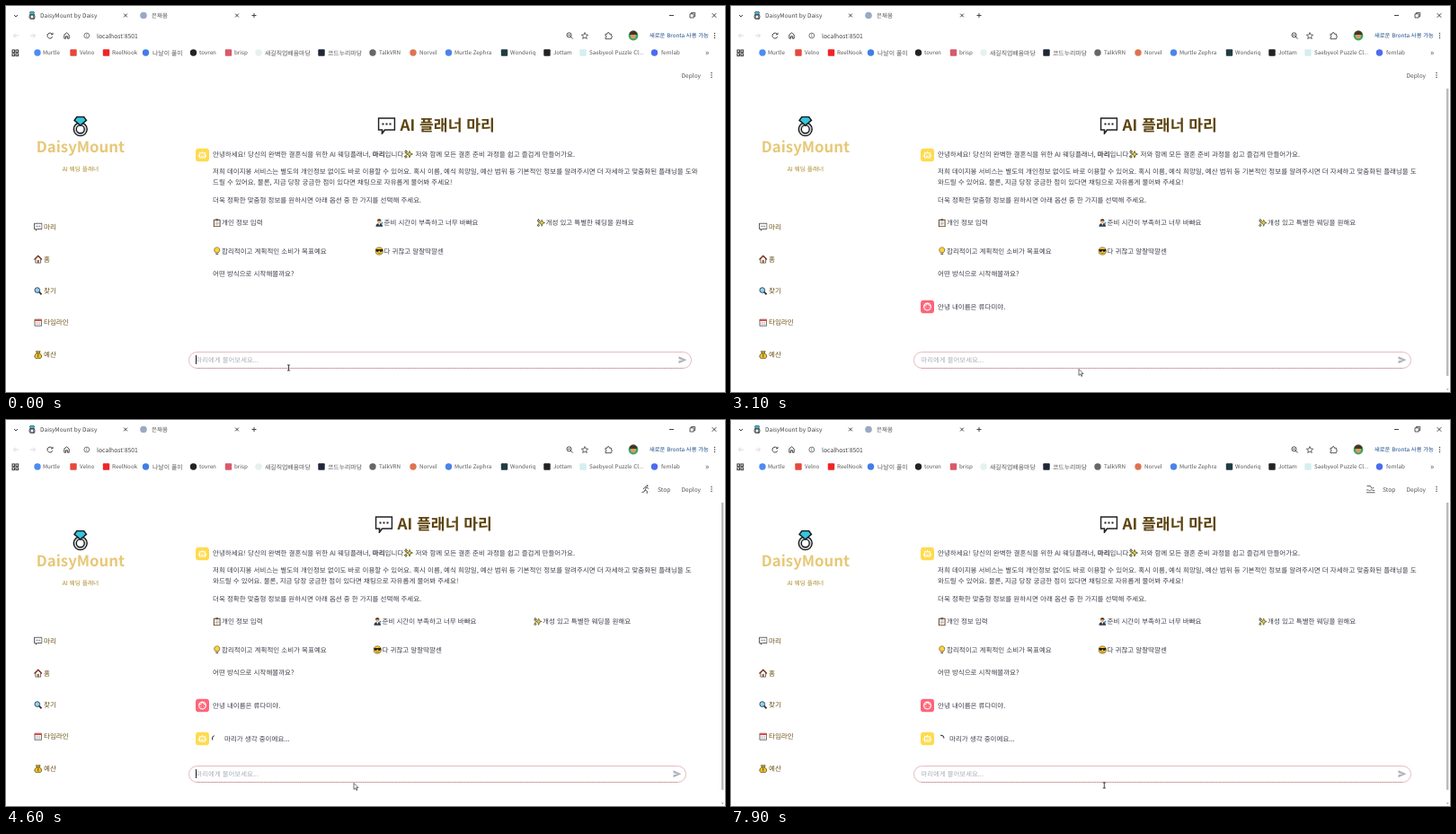
These frames come from a looping animation (800x430 px, 8 s). An HTML page:

```html
<!DOCTYPE html>
<html lang="ko">
<head>
<meta charset="utf-8">
<style>
html, body { margin: 0; width: 800px; height: 430px; overflow: hidden; background: #fff; }
svg { display: block; }
text { font-family: "Noto Sans CJK KR", "Noto Sans CJK JP", "Noto Sans CJK", sans-serif;
  white-space: pre; text-rendering: geometricPrecision; }
.line { fill: none; stroke: #333; stroke-width: 1; }
</style>
</head>
<body>
<svg width="800" height="430" viewBox="0 0 800 430">
<defs>
  <clipPath id="view"><rect y="88" width="800" height="289"/></clipPath>
  <symbol id="bubble" viewBox="0 0 20 20"><path d="M1 2h18v13H8l-3 4v-4H1z" fill="#fff" stroke="#222" stroke-width="1.6"/><path d="M5 8.5h2m2 0h2m2 0h2" stroke="#222" stroke-width="2"/></symbol>
  <symbol id="house" viewBox="0 0 20 20"><path d="M4 9v10h12V9l-6-6z" fill="#fff6e8" stroke="#333" stroke-width="1.5"/><path d="M1 11l9-9 9 9" fill="none" stroke="#7a3026" stroke-width="2.6"/><path d="M8 12h4v7H8z" fill="#8a5a35"/></symbol>
  <symbol id="find" viewBox="0 0 20 20"><path d="M12 12l6 6" stroke="#333" stroke-width="4"/><circle cx="8" cy="8" r="6" fill="#8fd3f4" stroke="#345" stroke-width="2"/></symbol>
  <symbol id="calendar" viewBox="0 0 20 20"><path d="M2 3h16v15H2z" fill="#fff" stroke="#444" stroke-width="1.6"/><path d="M2 3h16v4H2z" fill="#e8433c"/><path d="M5 10.5h10M5 14h10" stroke="#777" stroke-width="1.8" stroke-dasharray="2 2"/></symbol>
  <symbol id="money" viewBox="0 0 20 20"><path d="M7 6L5 2h10l-2 4c4 3 6 6 5 10q-1 3-8 3t-8-3c-1-4 1-7 5-10z" fill="#f2c230" stroke="#4a3a10" stroke-width="1.5"/><path d="M6 6.5h8M10 9v7" stroke="#4a3a10" stroke-width="1.8"/></symbol>
  <symbol id="clip" viewBox="0 0 20 20"><path d="M3 3h14v16H3z" fill="#fff" stroke="#6d4a2a" stroke-width="2.2"/><path d="M7 1h6v4H7z" fill="#555"/><path d="M6 9h8M6 12h8M6 15h6" stroke="#888" stroke-width="1.3"/></symbol>
  <symbol id="groom" viewBox="0 0 20 20"><path d="M2 19q0-8 8-8t8 8z" fill="#2b3a4d"/><path d="M8 11h4l-2 6z" fill="#fff"/><circle cx="10" cy="6.5" r="4.5" fill="#e5a868"/><path d="M5 6q0-5 5-5t5 5q-5-3-10 0z" fill="#40291a"/><path d="M14 13l4-4" stroke="#2d8ac0" stroke-width="3"/></symbol>
  <symbol id="spark" viewBox="0 0 20 20"><g fill="#f5cd3a" stroke="#2f3a18" stroke-width="1.3"><path d="M12 3l2 5 5 2-5 2-2 6-2-6-5-2 5-2z"/><path d="M4 1l1 3 3 1-3 1-1 3-1-3-2-1 2-1zM4 12l1 3 2 1-2 1-1 2-1-2-2-1 2-1z"/></g></symbol>
  <symbol id="bulb" viewBox="0 0 20 20"><path d="M7 14C1 9 4 1 10 1s9 8 3 13z" fill="#ffd23c" stroke="#5a4a18" stroke-width="1.4"/><path d="M7 15h6v4H7z" fill="#777"/></symbol>
  <symbol id="cool" viewBox="0 0 20 20"><circle cx="10" cy="10" r="9" fill="#fdc830" stroke="#4a3a10" stroke-width="1.3"/><path d="M2 6h16v3q-1 3-4 3t-4-4q-1 4-4 4T2 9z" fill="#222"/><path d="M6 14q4 3 8 0" class="line"/></symbol>
  <symbol id="ring" viewBox="0 0 20 24"><circle cx="10" cy="15.5" r="6.2" fill="none" stroke="#181818" stroke-width="4.6"/><circle cx="10" cy="15.5" r="6.2" fill="none" stroke="#cfd4d8" stroke-width="1.7"/><path d="M6 1h8l3 4-7 6-7-6z" fill="#35c6de" stroke="#181818" stroke-width="1.5"/></symbol>
  <symbol id="bot" viewBox="0 0 20 20"><rect width="20" height="20" rx="5" fill="#ffdb4d"/><path d="M6 7h8v7H6zM10 7V4.5M4.5 10v2m11-2v2" fill="none" stroke="#fff" stroke-width="1.5"/><path d="M8 9.5h1m2 0h1m-4 2.5h4" stroke="#fff" stroke-width="1.2"/></symbol>
  <symbol id="user" viewBox="0 0 20 20"><rect width="20" height="20" rx="5" fill="#ff6478"/><circle cx="10" cy="10" r="5.2" fill="none" stroke="#fff" stroke-width="1.5"/><path d="M5 9q4 0 5-4 1 3 5 4" fill="none" stroke="#fff" stroke-width="1.3"/><path d="M7.6 11.5h1m3 0h1" stroke="#fff" stroke-width="1.3"/></symbol>
</defs>
<g id="shell"></g>
<g clip-path="url(#view)"><g id="scroll">
  <g id="wide"></g><g id="narrow"></g><g id="sent"></g><g id="reply"></g>
  <g id="thinking"></g>
</g></g>
<g id="bar"><path d="M797.2 92V412" stroke="#b9babd" stroke-width="2.4"/><path d="M796 426.5h2.6l-1.3 1.6z" fill="#888"/></g>
<g id="running">
  <g id="runner" class="line" style="stroke:#555">
    <circle cx="713.5" cy="73.3" r="1" fill="#555" stroke="none"/>
    <path id="limbs"/>
  </g>
  <g id="swimmer" class="line" style="stroke:#666">
    <circle cx="714.5" cy="75.6" r=".8" fill="#666" stroke="none"/>
    <path id="arm"/><path d="M707 78.2q1.2-1 2.3 0t2.3 0 2.3 0 2.3 0M707 80.8h9.5"/>
  </g>
</g>
<rect id="box" x="203.5" y="385.5" height="18" rx="9" fill="#fff" stroke="#e3b4b8" stroke-width=".9"/>
<path id="dots" stroke="#b98f92" stroke-width=".7" stroke-dasharray="1.5 1"/>
<g id="field"></g>
<path id="wavy" fill="none" stroke="#e23b3b" stroke-width=".8"/>
<path id="caret" stroke="#222" stroke-width="1"/>
<path id="send" d="M0 0l9 4-9 4V5l5-1-5-1z"/>
<path id="beam" class="line" d="M-1.6-3h3.2M0-3V3M-1.6 3h3.2" style="stroke-width:.9"/>
<path id="arrow" d="M0 0v7l1.7-1.5 1.2 2.6 1-.5-1.1-2.5h2.3z" fill="#fff" stroke="#333" stroke-width=".7"/>
</svg>
<script>
const $ = id => document.getElementById(id);
const INK = '#3d3f4a', BROWN = '#6b4e14', SIZE = 7.51;

// y is the middle of the line
const text = (x, y, s, size = SIZE, fill = INK, more = '') =>
  `<text x="${x}" y="${y + size * .38}" font-size="${size}" fill="${fill}" ${more}>${s}</text>`;
const icon = (id, x, y, w = 9.5, h = w) =>
  `<use href="#${id}" x="${x}" y="${y - h / 2}" width="${w}" height="${h}"/>`;
const line = (d, color = '#444', w = 1) =>
  `<path d="${d}" fill="none" stroke="${color}" stroke-width="${w}"/>`;
const dot = (x, y, r, fill) => `<circle cx="${x}" cy="${y}" r="${r}" fill="${fill}"/>`;
const square = (x, y, r, fill) =>
  `<rect x="${x - r}" y="${y - r}" width="${2 * r}" height="${2 * r}" rx="1" fill="${fill}"/>`;
const cross = (x, y, r) => line(`M${x - r} ${y - r}l${2 * r} ${2 * r}m0 ${-2 * r}l${-2 * r} ${2 * r}`);
const kebab = (x, y) => [-2.6, 0, 2.6].map(d => dot(x, y + d, .75, '#444')).join('');

function browser() {
  const tabs = line('M9 10l2 2 2-2') + icon('ring', 25, 10.5, 8, 9.6) +
    text(38, 11, 'DaisyMount by Daisy', 6.5, '#444') + cross(133, 10.5, 1.9) +
    dot(153, 10.5, 3.8, '#9aa9c4') + text(162, 11, '은채움', 6.5, '#555') + cross(257, 10.5, 1.9) +
    line('M273.5 10.5h5M276 8v5') + line('M738 10.5h5') +
    line('M761 8.8h4.2v4.2h-4.2zM762.5 8.8v-1.4h4.2v4.2h-1.4', '#444', .9) + cross(788, 10.5, 2.3);
  const bar = line('M14 33H8.5m2.4-2.4L8.5 33l2.4 2.4M27 33h5.5m-2.4-2.4l2.4 2.4-2.4 2.4', '#d8d9dc') +
    line('M51.5 31.4a3 3 0 1 0 .3 2.8M52 29.8v2h-2') +
    line('M64.8 36.2v-4l2.7-2.4 2.7 2.4v4h-1.8v-2.5h-1.8v2.5z') +
    line('M92.7 33a2.9 2.9 0 1 0-5.8 0a2.9 2.9 0 1 0 5.8 0M89.8 32.6v2M89.8 31v.8', '#555', .8) +
    text(101, 33, 'localhost:8501', 6.75, '#444') +
    line('M629 32.3a2.5 2.5 0 1 0-5 0a2.5 2.5 0 1 0 5 0M628.3 34.1l2.4 2.4M625.3 32.3h2.4') +
    line('M644 29.5l1 2.5 2.7.2-2.1 1.7.7 2.6-2.3-1.4-2.3 1.4.7-2.6-2.1-1.7 2.7-.2z', '#444', .8) +
    line('M667 31.2h2q0-1.8 1.2-1.8t1.2 1.8h2v2q1 0 1 1t-1 1v1.5H667v-1.7q1.2-.2 1.2-1t-1.2-1z', '#444', .9) +
    dot(698, 33, 5.4, '#35a85a') + dot(698, 33.5, 3, '#d99a6c') +
    '<path d="M693.5 32q.5-4.5 4.5-4.5t4.5 4.5z" fill="#493524"/>' +
    text(716, 33, '새로운 Bronta 사용 가능', 6.3, '#174a86', 'font-weight="500"') + kebab(788.5, 33);
  const marks = [
    [35, dot, '#4c8bf5', 41, 'Murtle'], [75, square, '#e5483c', 82, 'Velno'],
    [111.5, square, '#f02525', 118, 'ReelNook'], [155.5, dot, '#3f7ee8', 163, '나날이 풀이'],
    [208.5, dot, '#222', 215, 'tovren'], [247.5, square, '#d9586a', 254, 'brisp'],
    [281, dot, '#e3f3ea', 288, '새길직업배움마당'], [351, square, '#1d2738', 358, '코드누리마당'],
    [408, dot, '#666', 415, 'TalkVRN'], [453, dot, '#de7350', 460, 'Norvel'],
    [492.5, dot, '#4b83ea', 499, 'Murtle Zephra'], [554.5, square, '#203c42', 561, 'Wonderiq'],
    [602, square, '#222', 609, 'Jottam'], [642, square, '#d5eef0', 649, 'Saebyeol Puzzle Cl...'],
    [721.5, dot, '#4b6cf0', 729, 'fernlab']
  ].map(([x, shape, color, tx, name]) => shape(x, 52, 3.7, color) +
    text(tx, 52, name, /[가-힣]/.test(name) ? 6.9 : 6.25, '#555')).join('');
  let grid = '';
  for (let i = 0; i < 4; i++)
    grid += `<rect x="${7 + i % 2 * 4}" y="${49 + (i >> 1) * 4}" width="2.6" height="2.6" class="line"/>`;
  return tabs + bar + grid + marks + text(778, 52, '»', 9, '#555') +
    text(751.5, 77.5, 'Deploy', 6.6, '#555') + kebab(785, 77);
}

function sidebar() {
  const items = [['bubble', '마리', 246], ['house', '홈', 282], ['find', '찾기', 317.5],
    ['calendar', '타임라인', 352.5], ['money', '예산', 388.5]];
  return icon('ring', 73, 134, 19.5, 23) +
    text(83, 156.8, 'DaisyMount', 16.8, '#e6c878', 'font-weight="700" text-anchor="middle"') +
    text(83, 181, 'AI 웨딩 플래너', 6.7, '#b08a2c', 'font-weight="500" text-anchor="middle"') +
    items.map(([id, s, y]) => icon(id, 31, y) + text(42, y, s, SIZE, BROWN, 'font-weight="500"')).join('');
}

function greeting(wide) {
  const d = wide ? 0 : 1;
  const cols = [230, 410.5 - 2 * d, 590.5 - 3.5 * d];
  const option = (id, col, y, s) => icon(id, cols[col], y) + text(cols[col] + 10, y, s);
  return icon('bubble', 413.5 - 3 * d, 133, 20) +
    text(438.5 - 3 * d, 132.5, 'AI 플래너 마리', 17.2, '#5c430f', 'font-weight="700"') +
    icon('bot', 211, 166, 15) +
    text(230, 165, '안녕하세요! 당신의 완벽한 결혼식을 위한 AI 웨딩플래너, <tspan font-weight="700">마리</tspan>입니다.') +
    icon('spark', 443, 165, 10) +
    text(455.5, 165, '저와 함께 모든 결혼 준비 과정을 쉽고 즐겁게 만들어가요.') +
    text(230, 184, '저희 데이지봉 서비스는 별도의 개인정보 없이도 바로 이용할 수 있어요. 혹시 이름, 예식 희망일, 예산 범위 등 ' +
      '기본적인 정보를 알려주시면 더 자세하고 맞춤화된 플래닝을 도' + (wide ? '와' : '')) +
    text(230, 196.5, (wide ? '' : '와') + '드릴 수 있어요. 물론, 지금 당장 궁금한 점이 있다면 채팅으로 자유롭게 물어봐 주세요!') +
    text(230, 216, '더욱 정확한 맞춤형 정보를 원하시면 아래 옵션 중 한 가지를 선택해 주세요.') +
    option('clip', 0, 241.5, '개인 정보 입력') +
    option('groom', 1, 241.5, '준비 시간이 부족하고 너무 바빠요') +
    option('spark', 2, 241.5, '개성 있고 특별한 웨딩을 원해요') +
    option('bulb', 0, 273, '합리적이고 계획적인 소비가 목표예요') +
    option('cool', 1, 273, '다 귀찮고 알잘딱깔센') +
    text(230, 298.5, '어떤 방식으로 시작해볼까요?');
}

const MESSAGE = '안녕 내이름은 류다미야.';
$('shell').innerHTML = browser() + sidebar();
$('wide').innerHTML = greeting(true);
$('narrow').innerHTML = greeting(false);
$('sent').innerHTML = icon('user', 211, 335, 15) + text(230, 335, MESSAGE);
$('reply').innerHTML = icon('bot', 211, 372, 15);
$('thinking').innerHTML = text(243, 372, '마리가 생각 중이에요...') +
  '<path id="spin" d="M-2.6-2.6A3.7 3.7 0 0 1 2.6-2.6" class="line"/>';
$('running').insertAdjacentHTML('beforeend', text(725, 77.5, 'Stop', 6.7, '#555'));
$('field').innerHTML = text(211.5, 394, '', 7.4);
const field = $('field').firstChild;

const typing = [[100, '아'], [200, '안녀'], [300, '안녕'], [400, '안녕 내'], [500, '안녕 내이'],
  [600, '안녕 내이르'], [700, '안녕 내이름은'], [900, '안녕 내이름은 류'], [1000, '안녕 내이름은 류다'],
  [1100, '안녕 내이름은 류다미'], [1200, '안녕 내이름은 류다미야'], [1400, MESSAGE], [2900, '']];

// time, x, y of the pointer
const path = [[0, 314.5, 403], [100, 314.5, 403], [500, 345, 407], [1300, 345, 407], [1600, 387, 404.5],
  [5000, 387, 404.5], [5400, 414, 402.5], [5800, 414, 402.5], [6200, 416.5, 407], [7400, 416.5, 407],
  [7700, 415.3, 407], [8000, 415.3, 407]];

const ease = k => (k = Math.min(1, Math.max(0, k)), k * k * (3 - 2 * k));
const show = (id, on) => $(id).setAttribute('display', on ? 'inline' : 'none');
const set = (id, name, value) => $(id).setAttribute(name, value);
const wave = (x, end) => {
  let d = `M${x} 399`;
  for (let i = 0; x + i < end; i += 1.5) d += `q.75 ${i % 3 ? 1.4 : -1.4} 1.5 0`;
  return d;
};

function draw(t) {
  const wide = t < 3000;
  show('wide', wide);
  show('narrow', !wide);
  show('bar', !wide);
  show('sent', t >= 3000);
  show('reply', t >= 3200);
  show('thinking', t >= 3500);
  show('running', t >= 3700);
  set('scroll', 'transform', `translate(0 ${-17 * ease((t - 3500) / 200)})`);
  set('spin', 'transform', `translate(233.3 372) rotate(${t * .36 + 75})`);

  const odd = Math.floor(t / 100) % 2;
  show('runner', t < 5000);
  show('swimmer', t >= 5000);
  set('limbs', 'd', odd ? 'M712.5 75l-1.5 3 2.5 1v3M711 78l-3 2M709 76l3-1.5 3 2.5'
    : 'M712.5 75l-1.5 3 2.5 1.5-.5 2.5M711 78l-1 2-2.5.5M709 77l2-2.5 2 .5 2 1.5');
  set('arm', 'd', odd ? 'M707.5 73.5h4l1.5 3' : 'M708 75l3-1.5 2.5 3');

  const s = typing.reduce((now, [at, v]) => t >= at ? v : now, '');
  field.textContent = s || '마리에게 물어보세요...';
  field.setAttribute('fill', s ? INK : '#acaeba');
  const caret = 211.5 + (s ? field.getComputedTextLength() + .5 : 0);
  const lit = t < 1600 || (t - (t < 2900 ? 100 : 200)) % 1000 < 500;
  set('caret', 'd', `M${caret} 389v10`);
  show('caret', lit);
  show('wavy', s && t >= 900);
  set('wavy', 'd', wave(227, 254) + (t >= 2000 ? wave(256, 284) : ''));

  const right = wide ? 762.5 : 756.5;
  set('box', 'width', right - 203.5);
  set('dots', 'd', `M212 403.5H${right - 9}`);
  set('send', 'transform', `translate(${right - 14} 390.3)`);
  set('send', 'fill', s ? '#565964' : '#b0b2bb');

  const i = path.findIndex(p => p[0] > t), a = path[i - 1], b = path[i];
  const k = ease((t - a[0]) / (b[0] - a[0]));
  const at = `translate(${a[1] + (b[1] - a[1]) * k} ${a[2] + (b[2] - a[2]) * k})`;
  const arrow = t >= 300 && t < 5300;
  show('arrow', arrow);
  show('beam', !arrow);
  set('arrow', 'transform', at);
  set('beam', 'transform', at);
}

const start = performance.now();
(function tick() {
  draw((performance.now() - start) % 8000);
  requestAnimationFrame(tick);
})();
</script>
</body>
</html>
```
